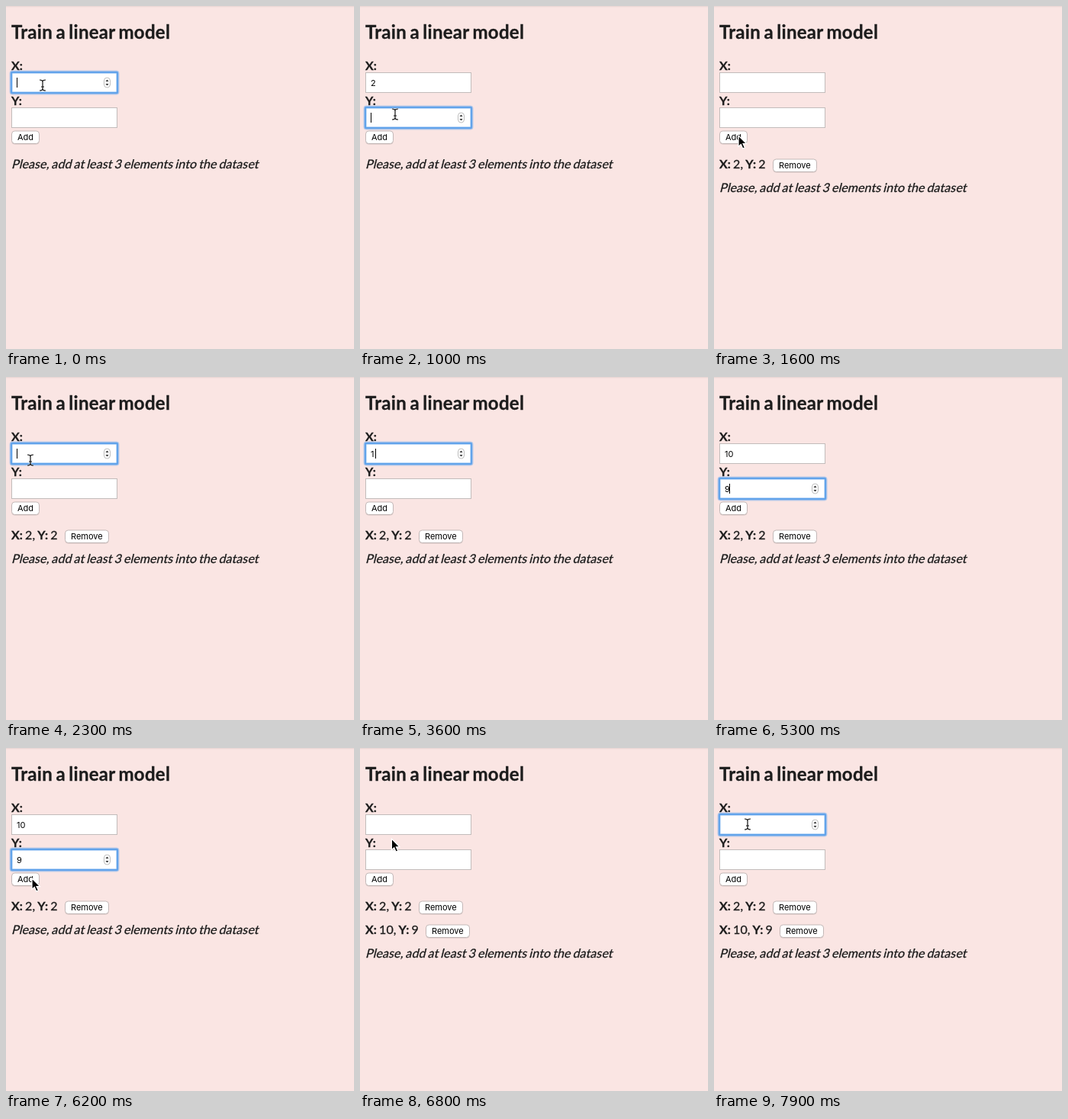
Recreate the animation shown at these times as an HTML page. Size 456 by 450 pixels, loop 8000 ms.

```html
<!DOCTYPE html>
<html lang="en">
<head>
<meta charset="utf-8">
<title>Linear model trainer</title>
<style>
html, body { margin: 0; width: 100%; height: 100%; overflow: hidden; background: #fae5e3; }
svg { display: block; }
text {
  font: 16px Lato, sans-serif; fill: #1c1c1c; stroke: #1c1c1c; stroke-width: .3px;
  white-space: pre; letter-spacing: .006em; word-spacing: -.075em;
}
.bold { font-weight: 700; }
.title { font-size: 24px; font-weight: 700; letter-spacing: .0125em; }
.ui { font: 11px Inter, sans-serif; fill: #000; stroke: none; letter-spacing: 0; }
</style>
</head>
<body>
<svg id="stage" width="456" height="450" viewBox="0 0 456 450"></svg>
<script>
const LOOP = 8000, STEP = 100, BLINK = 500, GLIDE = 300, ROW = 31;
const stage = document.getElementById('stage');

// The user's session: key presses, and clicks the pointer glides to.
const script = [
  { at: 100, key: '2' },
  { at: 500, to: 'Y', x: 46, y: 142 },
  { at: 1100, key: '2' },
  { at: 1500, to: 'Add', x: 32, y: 169 },
  { at: 2100, to: 'X', x: 32, y: 109 },
  { at: 3600, key: '1' },
  { at: 4000, key: '0' },
  { at: 4600, to: 'Y', x: 38, y: 143 },
  { at: 5300, key: '9' },
  { at: 6300, to: 'Add', x: 34, y: 170 },
  { at: 7000, to: 'X', x: 44, y: 100 }
];

// Replays the session up to time t. Typing hides the pointer until it moves again.
function replay(t) {
  const s = { X: '', Y: '', rows: [], focus: 'X', x: 48, y: 104, hidden: false, clicked: false };
  let active = 0;
  for (const { at, key, to, x, y } of script) {
    if (key) {
      if (t < at) break;
      s[s.focus] += key;
      s.hidden = true;
      active = at;
      continue;
    }
    // The pointer comes to rest one step before the click.
    const p = Math.min(1, (t - at + STEP + GLIDE) / GLIDE);
    if (p <= 0) break;
    const ease = p * p * (3 - 2 * p);
    s.x += (x - s.x) * ease;
    s.y += (y - s.y) * ease;
    s.hidden = false;
    s.clicked = t >= at && t < at + STEP;
    if (t < at + STEP) break;
    if (to === 'Add') {
      s.rows.push([s.X, s.Y]);
      s.X = s.Y = s.focus = '';
    } else {
      s.focus = to;
      active = at + STEP;
    }
  }
  s.caret = Math.floor((t - active) / BLINK) % 2 === 0;
  return s;
}

const rect = (x, y, w, h, attrs) => `<rect x="${x}" y="${y}" width="${w}" height="${h}" ${attrs}/>`;
const text = (x, y, cls, s) => `<text x="${x}" y="${y}" class="${cls}">${s}</text>`;
const bold = s => `<tspan class="bold">${s}</tspan>`;

const button = (x, y, w, label) =>
  rect(x + .5, y + 1, w - 1, 17, 'rx="4" fill="#d2c0be"') +
  rect(x + .5, y + .5, w - 1, 16.5, 'rx="4" fill="#fff" stroke="#c3b8b7"') +
  text(x + 8, y + 12.5, 'ui', label);

const spinner = y =>
  rect(128.5, y + 7, 8, 13, 'rx="4" fill="#fff" stroke="#bdbdbd"') +
  `<path d="M130.5 ${y + 12}l2-2.5 2 2.5zM130.5 ${y + 15}l2 2.5 2-2.5z" fill="#333"/>`;

const inside = (y, top) => y >= top && y < top + 27;

function field(name, y, s) {
  const focused = s.focus === name;
  let out = text(7, y - 3, 'bold', name + ':') +
    rect(7.5, y + .5, 138, 26, 'fill="#fff" stroke="#c2bcbb"');
  if (focused) {
    out += rect(6.5, y - .5, 140, 28, 'rx="2" fill="none" stroke="#6aaaf0" stroke-width="4" opacity=".45"') +
      rect(7, y, 139, 27, 'rx="1" fill="none" stroke="#62a3ea" stroke-width="2.4"');
  }
  if (focused || inside(s.y, y)) out += spinner(y);
  out += text(14, y + 18, 'ui', s[name]);
  if (focused && s.caret) out += rect(14 + 6 * s[name].length, y + 7, 1, 13, 'fill="#000"');
  return out;
}

function entry([a, b], i) {
  const y = 212.5 + ROW * i, digits = a.length + b.length;
  return text(7, y, '', `${bold('X:')} ${a}, ${bold('Y:')} ${b}`) +
    button(59 + 9 * digits, y - 12, 58, 'Remove');
}

function pointer({ x, y, clicked }) {
  const ring = clicked ? '<circle r="15" fill="none" stroke="#000" stroke-width="3"/>' : '';
  const bar = 'M-4-7Q0-7 0-4.5Q0-7 4-7M0-5V5M-4 7Q0 7 0 4.5Q0 7 4 7M-2 2H2';
  const beam = `<path d="${bar}" fill="none" stroke="#fff" stroke-width="2.4" opacity=".7"/>
    <path d="${bar}" fill="none" stroke="#111" stroke-width="1.2"/>`;
  const arrow = '<path d="M0 1V15.5L3.3 12.5 5.7 18 8.4 16.8 6 11.6H10.5Z" stroke="#fff" stroke-width="1.2"/>';
  const shape = inside(y, 87) || inside(y, 133) ? beam : arrow;
  return `<g transform="translate(${x} ${y})">${ring}${shape}</g>`;
}

function draw(t) {
  const s = replay(t);
  stage.innerHTML =
    rect(0, 0, 456, 1, 'fill="#ead7d5"') + rect(0, 1, 456, 1, 'fill="#f5e0de"') +
    text(7, 43, 'title', 'Train a linear model') +
    field('X', 87, s) + field('Y', 133, s) +
    button(7, 163.5, 37, 'Add') +
    s.rows.map(entry).join('') +
    `<g transform="translate(7 ${212.5 + ROW * s.rows.length}) skewX(-14)">` +
    text(0, 0, '', 'Please, add at least 3 elements into the dataset') + '</g>' +
    (s.hidden ? '' : pointer(s));
}

const start = performance.now();
let shown = -1;
function tick() {
  const elapsed = Math.max(0, performance.now() - start) % LOOP;
  const t = Math.floor(elapsed / STEP) * STEP;
  if (t !== shown) draw(shown = t);
  requestAnimationFrame(tick);
}
tick();
</script>
</body>
</html>
```
